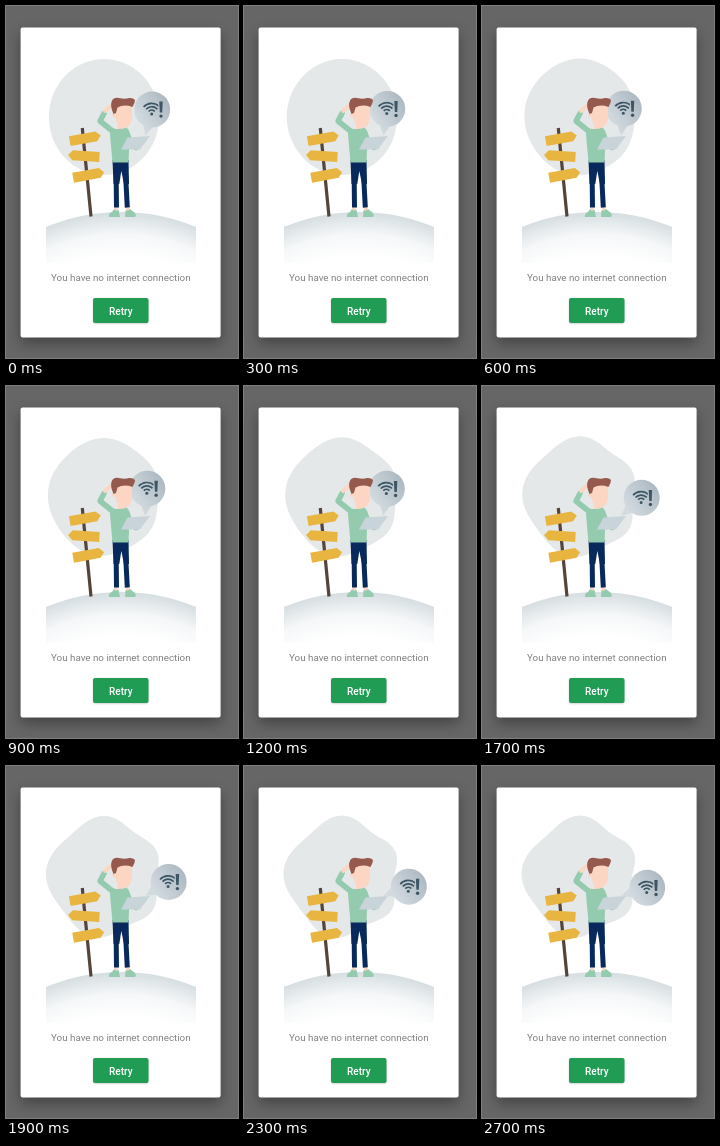
These frames come from a looping animation (232 px wide and 352 px high, 2.8 s). An HTML page with a canvas:

```html
<!DOCTYPE html>
<html lang="en">
<head>
<meta charset="utf-8">
<title>No connection</title>
<style>
html, body { margin: 0; width: 100%; height: 100%; overflow: hidden; background: #666; }
canvas { display: block; width: 232px; height: 352px; }
</style>
</head>
<body>
<canvas id="stage"></canvas>
<script>
const LOOP = 2800, STEP = 100, TAU = Math.PI * 2;
const canvas = document.getElementById('stage');
const ctx = canvas.getContext('2d');
const ratio = window.devicePixelRatio || 1;
canvas.width = 232 * ratio;
canvas.height = 352 * ratio;

const mix = (a, b, k) => a + (b - a) * k;
const clamp = v => Math.min(1, Math.max(0, v));
const smooth = k => k * k * (3 - 2 * k);

// cubic-bezier(.25, .1, .25, 1)
function ease(x) {
  x = clamp(x);
  let lo = 0, hi = 1;
  for (let i = 0; i < 20; i++) {
    const u = (lo + hi) / 2, v = 1 - u;
    if (0.75 * v * v * u + 0.75 * v * u * u + u ** 3 < x) lo = u; else hi = u;
  }
  const v = 1 - lo;
  return 0.3 * v * v * lo + 3 * v * lo * lo + lo ** 3;
}

function shape(color, path) {
  ctx.fillStyle = color;
  ctx.fill(new Path2D(path));
}

function line(color, width, path, cap = 'round') {
  ctx.strokeStyle = color;
  ctx.lineWidth = width;
  ctx.lineCap = cap;
  ctx.lineJoin = 'round';
  ctx.stroke(new Path2D(path));
}

function disc(color, x, y, r) {
  ctx.fillStyle = color;
  ctx.beginPath();
  ctx.arc(x, y, r, 0, TAU);
  ctx.fill();
}

function label(text, y, color, font) {
  ctx.fillStyle = color;
  ctx.font = font + ' Roboto, sans-serif';
  ctx.textAlign = 'center';
  ctx.fillText(text, 114.8, y);
}

function box(color, x, y, w, h, blur, alpha) {
  ctx.save();
  ctx.shadowColor = `rgba(0,0,0,${alpha})`;
  ctx.shadowBlur = blur * ratio;
  ctx.shadowOffsetY = blur * 0.4 * ratio;
  ctx.fillStyle = color;
  ctx.beginPath();
  ctx.roundRect(x, y, w, h, 2);
  ctx.fill();
  ctx.restore();
}

// An oval that grows five uneven lobes, the angle running clockwise from the top
function drawBlob(t) {
  const wave = 3.5 * smooth(clamp(t / 2400));
  ctx.fillStyle = '#e4e8e9';
  ctx.beginPath();
  for (let a = 0; a < TAU; a += TAU / 180) {
    const lobes = Math.cos(5 * (a + 0.23 * (1 - Math.cos(a))));
    const r = 56.5 + 1.4 * Math.cos(2 * a) + wave * lobes;
    ctx.lineTo(98 + r * Math.sin(a), 111 - r * Math.cos(a));
  }
  ctx.fill();
}

function drawHill() {
  const r = 195, x = 115, y = 206 + r;
  const g = ctx.createRadialGradient(x, y, r - 44, x, y, r);
  g.addColorStop(0, '#fff');
  g.addColorStop(0.5, '#f5f7f8');
  g.addColorStop(1, '#d6dee1');
  ctx.save();
  ctx.beginPath();
  ctx.rect(40, 200, 150, 57);
  ctx.clip();
  disc(g, x, y, r);
  ctx.restore();
}

function plank(x, y, angle, side) {
  ctx.save();
  ctx.translate(x, y);
  ctx.rotate(angle);
  ctx.scale(side, 1);
  shape('#e8b540', 'M-15.5 -5H11.5L16 0L11.5 5H-15.5Z');
  ctx.restore();
}

function drawSign() {
  line('#55443a', 3.2, 'M76.3 122L85 210.5', 'butt');
  plank(79, 132.4, -0.18, 1);
  plank(78, 150, 0.06, -1);
  plank(82.4, 169, -0.18, 1);
}

function drawPerson() {
  const skin = '#fcd6c3', green = '#94cbae', navy = '#08295c', hair = '#95594d';
  // Legs and shoes
  line(skin, 3.5, 'M110 198V206M121.5 198L122 206', 'butt');
  shape(green, 'M108 203Q110 206 112.5 203.5L114 211H103Q102 208 106 206Z');
  shape(green, 'M119.5 204Q122 206 124 203L129 207Q131 211 128 211H119Z');
  line(navy, 5, 'M110 158L110.5 201.5M119 158L121.3 201.5', 'butt');
  shape(navy, 'M106.5 154H122.5L123 178H118L115.3 165L113.3 178H107.5Z');
  // Raised arm
  line(green, 5.5, 'M107 125.5L94 115L98 107.5');
  line(skin, 4, 'M99 105L104.5 100');
  // Body
  line(skin, 7.5, 'M115.5 115V124', 'butt');
  shape(green, 'M107 122.5Q115 124 120.5 121.5Q124 124 123.5 133L122.5 156.5H106.5Q105 140 104 128Q104 123 107 122.5Z');
  // Head
  shape(skin, 'M108.5 99H126V112Q125 121.5 118 121.5Q111 121 109 111Z');
  disc(skin, 108, 109, 2);
  shape(hair, 'M107.5 108Q104 100 105.5 96Q107 91 113 92Q119 93.5 123 92Q127 91.5 129 94Q129 97 126.5 101Q118 98 111.5 101.5L110 107Z');
  // Arm with tablet
  line(green, 5.5, 'M120.5 126L125 138L130 141.5');
  shape('#c9d4da', 'M121.5 131.5L144 130L134 143.5L115 143.5Z');
}

function bubbleAngle(t) {
  const [from, to, k] = t < 1100
    ? [73, 4.5, (t + 1100) / 2000]
    : [4.5, 73, (t - 1100) / 1600];
  return mix(from, to, ease(k)) * Math.PI / 180;
}

function drawAlert(x, y) {
  const ink = '#3c5665';
  ctx.save();
  ctx.translate(x - 0.5, y + 4.6);
  disc(ink, 0, 0, 1.5);
  disc(ink, 9.3, 2, 1.7);
  shape(ink, 'M7.6 -12.5H11L10.5 -1.5H8.1Z');
  ctx.beginPath();
  ctx.rect(-15, -15, 21.6, 20);
  ctx.clip();
  ctx.strokeStyle = ink;
  ctx.lineWidth = 1.7;
  for (let r = 4; r < 12; r += 3.4) {
    ctx.beginPath();
    ctx.arc(0, 0, r, -Math.PI * 0.77, -Math.PI * 0.23);
    ctx.stroke();
  }
  ctx.restore();
}

// The bubble swings round the tip of its tail
function drawBubble(t) {
  const a = bubbleAngle(t), reach = 27.2;
  const tipX = 139.2, tipY = 129.8;
  const x = tipX + reach * Math.sin(a), y = tipY - reach * Math.cos(a);
  const g = ctx.createLinearGradient(x - 15, y + 10, x + 15, y - 10);
  g.addColorStop(0, '#d3dbe0');
  g.addColorStop(1, '#adb9c2');
  disc(g, x, y, 18);
  ctx.save();
  ctx.beginPath();
  ctx.moveTo(tipX, tipY);
  for (const s of [-0.45, 0.45]) ctx.lineTo(x - 15 * Math.sin(a + s), y + 15 * Math.cos(a + s));
  ctx.fill();
  ctx.restore();
  drawAlert(x, y);
}

function draw(t) {
  ctx.setTransform(ratio, 0, 0, ratio, 0, 0);
  ctx.fillStyle = '#666';
  ctx.fillRect(0, 0, 232, 352);
  box('#fff', 14.6, 21.6, 200, 310, 14, 0.35);
  drawBlob(t);
  drawHill();
  drawSign();
  drawBubble(t);
  drawPerson();
  label('You have no internet connection', 274.8, '#808080', '9.8px');
  box('#219c55', 87, 292, 55.5, 25, 2, 0.2);
  label('Retry', 308.6, '#fff', '500 10px');
}

function tick() {
  const t = performance.now() % LOOP;
  draw(Math.floor(t / STEP) * STEP);
  requestAnimationFrame(tick);
}
tick();
</script>
</body>
</html>
```
